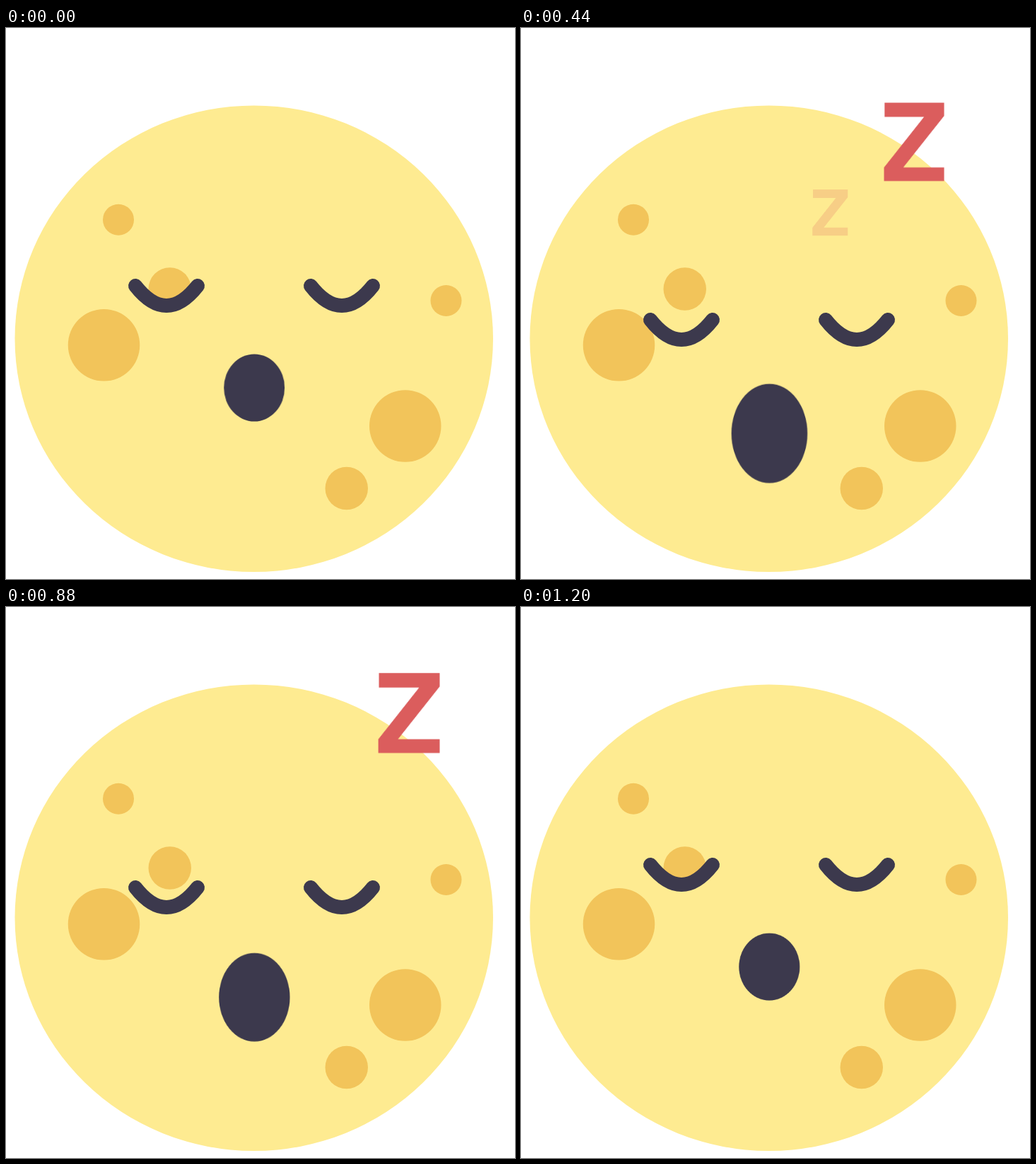
An HTML page without scripts for the animation above (1400 ms loop, 720 by 778 pixels).

```html
<!DOCTYPE html>
<html lang="en">
<head>
<meta charset="utf-8">
<title>Sleeping moon</title>
<style>
  html, body { margin: 0; width: 100%; height: 100%; overflow: hidden; background: #fff; }
  svg { display: block; width: 100%; height: 100%; }

  .moon { fill: #feeb91; }
  .spots { fill: #f2c45a; }
  .mouth { fill: #3c394d; }
  .eyes { fill: none; stroke: #3c394d; stroke-width: 20; stroke-linecap: round; }
  .z { fill: #db5d5d; }

  /* The loop ticks every 40 ms; most segments last three ticks. */
  .eyes, .mouth, .z {
    animation-duration: 1400ms;
    animation-delay: -1ms;
    animation-timing-function: steps(3);
    animation-iteration-count: infinite;
  }
  .eyes { animation-name: nod; }
  .mouth { animation-name: yawn; }
  .z1 { animation-name: rise1, fade1; }
  .z2 { animation-name: rise2, fade2; }

  @keyframes nod {
    0%, 2.8571% { transform: translateY(0); animation-timing-function: steps(6); }
    20%, 57.1429% { transform: translateY(48px); animation-timing-function: steps(6); }
    74.2857%, 100% { transform: translateY(0); }
  }
  @keyframes yawn {
    0%, 2.8571% { transform: translate(351.25px, 508px) scale(1, 1); animation-timing-function: steps(6); }
    20%, 57.1429% { transform: translate(351.4px, 572.5px) scale(1.25, 1.474); animation-timing-function: steps(6); }
    74.2857%, 100% { transform: translate(351.25px, 508px) scale(1, 1); }
  }

  @keyframes rise1 {
    0%, 5.7143% { transform: translate(442px, 257px) scale(.513); }
    14.2857% { transform: translate(478.75px, 226.5px) scale(.63); }
    22.8571% { transform: translate(516.5px, 194px) scale(.746); }
    31.4286% { transform: translate(556px, 160.75px) scale(.85); }
    40% { transform: translate(594.8px, 128.4px) scale(.906); }
    48.5714% { transform: translate(634.3px, 96.7px) scale(.968); }
    57.1429%, 100% { transform: translate(673.5px, 65.5px) scale(1.028); }
  }
  @keyframes rise2 {
    0%, 25.7143% { transform: translate(414.5px, 279px) scale(.428); }
    34.2857% { transform: translate(448.6px, 251.3px) scale(.536); }
    42.8571% { transform: translate(482.7px, 223.1px) scale(.642); }
    51.4286% { transform: translate(519.25px, 191.5px) scale(.755); }
    60% { transform: translate(557.5px, 160.2px) scale(.85); }
    68.5714% { transform: translate(595.1px, 128.7px) scale(.905); }
    77.1429% { transform: translate(634.1px, 97px) scale(.966); }
    85.7143%, 100% { transform: translate(673.7px, 65.5px) scale(1.027); }
  }

  @keyframes fade1 {
    0%, 2.8571% { opacity: 0; }
    11.4286%, 45.7143% { opacity: 1; }
    54.2857% { opacity: .06; animation-timing-function: steps(1); }
    57.1429%, 100% { opacity: 0; }
  }
  @keyframes fade2 {
    0%, 28.5714% { opacity: 0; animation-timing-function: steps(1); }
    31.4286% { opacity: .2; animation-timing-function: steps(2); }
    37.1429% { opacity: .83; animation-timing-function: steps(1); }
    40%, 74.2857% { opacity: 1; }
    82.8571% { opacity: .06; animation-timing-function: steps(1); }
    85.7143%, 100% { opacity: 0; }
  }
</style>
</head>
<body>
<svg viewBox="0 0 720 778">
  <defs>
    <path id="eye" d="M183 364Q227 420 271 364"/>
    <path id="zed" d="M-49-65H50V-43L-18 42.5H50V65H-50V42.5L16.5-41.5H-49Z"/>
  </defs>

  <ellipse class="moon" cx="350.75" cy="438.75" rx="338.25" ry="329.25"/>
  <g class="spots">
    <circle cx="159" cy="270.75" r="22"/>
    <circle cx="231.75" cy="368.5" r="30.25"/>
    <circle cx="138.5" cy="447.75" r="50.75"/>
    <circle cx="622.5" cy="385" r="22"/>
    <circle cx="564.75" cy="562" r="50.75"/>
    <circle cx="481.75" cy="650" r="30.25"/>
  </g>

  <g class="eyes">
    <use href="#eye"/>
    <use href="#eye" x="248"/>
  </g>
  <ellipse class="mouth" rx="43" ry="47.5"/>

  <use class="z z1" href="#zed"/>
  <use class="z z2" href="#zed"/>
</svg>
</body>
</html>
```
